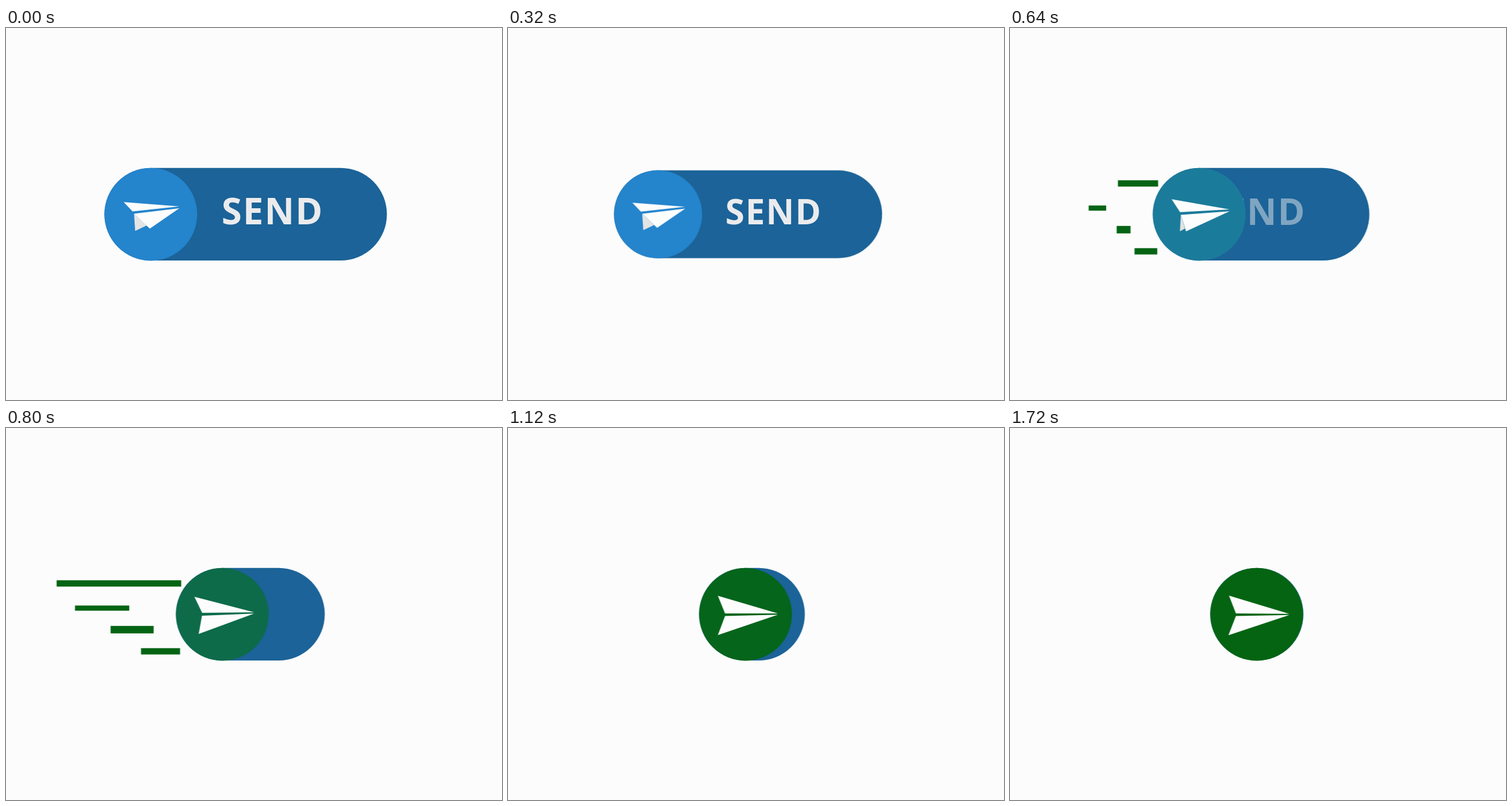
An HTML page without scripts for the animation above (1.76 s loop, 864x648 px).

```html
<!DOCTYPE html>
<html lang="en">
<head>
<meta charset="utf-8">
<title>Send button</title>
<style>
  html, body { margin: 0; width: 100%; height: 100%; overflow: hidden; background: #fcfcfc; }
  svg { display: block; width: 100%; height: 100%; }

  .button, .slide, .pill, .disc, .label, .wing, .keel, .fold, .streaks path {
    animation: 1760ms linear infinite both;
  }

  .button { transform-origin: 432px 324.5px; animation-name: press; animation-timing-function: ease-in-out; }
  .slide { animation-name: slide; }
  .pill { fill: #1b6398; animation-name: shrink; }
  .disc { fill: #2484cc; animation-name: tint; }
  .label {
    fill: #ebebed;
    font: 700 64px "Open Sans", "Noto Sans", sans-serif;
    letter-spacing: 1.8px;
    animation-name: leave;
  }
  .wing, .keel { fill: #fdfdfd; }
  .wing { animation-name: wing; }
  .keel { animation-name: keel; }
  .fold { fill: #e4e4e4; animation-name: fold; }
  .streaks path {
    fill: none;
    stroke: #046414;
    stroke-dasharray: 1 2;
    animation-name: streak;
    animation-delay: 60ms;
  }
  .streaks .first { animation-delay: 0ms; }

  @keyframes press {
    0%, 25%, 100% { transform: scale(1); }
    12.5% { transform: scale(.91); }
  }

  @keyframes slide {
    0%, 25% { transform: translateX(0); }
    27.27% { transform: translateX(4.4px); }
    29.55% { transform: translateX(15.5px); }
    31.82% { transform: translateX(32px); }
    34.09% { transform: translateX(54px); }
    36.36% { transform: translateX(77px); }
    38.64% { transform: translateX(94px); }
    40.91% { transform: translateX(106.5px); }
    45.45% { transform: translateX(124.5px); }
    50% { transform: translateX(136.7px); }
    54.55% { transform: translateX(147.3px); }
    63.64% { transform: translateX(161.5px); }
    72.73% { transform: translateX(171.3px); }
    81.82% { transform: translateX(176px); }
    97.73%, 100% { transform: translateX(177.5px); }
  }

  @keyframes shrink {
    0%, 25% { width: 492px; }
    27.27% { width: 487.6px; }
    29.55% { width: 475.5px; }
    31.82% { width: 456.2px; }
    34.09% { width: 425.7px; }
    36.36% { width: 378.2px; }
    38.64% { width: 333.9px; }
    40.91% { width: 300.1px; }
    45.45% { width: 259.5px; }
    50% { width: 231px; }
    54.55% { width: 210.5px; }
    63.64% { width: 184.1px; }
    72.73% { width: 169.7px; }
    81.82% { width: 163.5px; }
    97.73%, 100% { width: 162px; }
  }

  @keyframes tint {
    0%, 26% { fill: #2484cc; }
    29.55% { fill: #2382c6; }
    33% { fill: #2081ba; }
    45.45% { fill: #0d6b4a; }
    54.55% { fill: #08672c; }
    63.64% { fill: #04651b; }
    81.82%, 100% { fill: #046412; }
  }

  @keyframes leave {
    0%, 27.27% { transform: translateX(0); opacity: 1; }
    29.55% { transform: translateX(-1px); }
    31.82% { transform: translateX(-4px); opacity: 1; }
    34.09% { transform: translateX(-12px); }
    36.36% { transform: translateX(-37px); }
    38.64% { transform: translateX(-64px); }
    40.91%, 100% { transform: translateX(-85px); opacity: 0; }
  }

  @keyframes wing {
    0%, 26% { d: path("M205 303.3L302 310.7L220.5 319.5Z"); }
    29.55% { d: path("M204.5 301.5L303 312.3L220 319.7Z"); }
    45.45% { d: path("M203.5 294L307.5 321L217 322Z"); }
    63.64% { d: path("M204 292.3L308.5 323L216.5 323Z"); }
    81.82%, 100% { d: path("M204 292L309 323.7L216 323Z"); }
  }

  @keyframes keel {
    0%, 26% { d: path("M223 323.5L302 314L250.5 349.5Z"); }
    29.55% { d: path("M222.5 324.5L303 316L243 351Z"); }
    45.45% { d: path("M216.7 327L307.5 323.3L211 358.7Z"); }
    63.64% { d: path("M216.5 327.5L308.5 325.3L204 360.7Z"); }
    81.82%, 100% { d: path("M216 327.5L309 325.8L203 361Z"); }
  }

  @keyframes fold {
    0%, 26% { d: path("M223 323.5L225 353.5L245 344Z"); opacity: 1; }
    29.55% { d: path("M222.7 324.5L223.5 352.7L238 345Z"); opacity: 1; }
    43% { opacity: 1; }
    45.45%, 100% { d: path("M216.7 327L212 356L213 355Z"); opacity: 0; }
  }

  /* grows out to the left, then its near end catches up */
  @keyframes streak {
    0%, 28.7% { stroke-dashoffset: 1; visibility: hidden; }
    28.71% { stroke-dashoffset: 1; visibility: visible; }
    42.05%, 45.45% { stroke-dashoffset: 0; }
    54.55% { stroke-dashoffset: -1; visibility: visible; }
    54.56%, 100% { stroke-dashoffset: -1; visibility: hidden; }
  }
</style>
</head>
<body>
<svg viewBox="0 0 864 648">
  <g class="button">
    <g class="slide">
      <rect class="pill" x="171.5" y="243.7" width="492" height="161.4" rx="80.7"/>
    </g>
    <text class="label" x="375.5" y="342.5">SEND</text>
    <g class="slide">
      <g class="streaks">
        <path d="M180.5 270.8H-36.5" pathLength="1" stroke-width="11"/>
        <path d="M90 313.7H-4.5" pathLength="1" stroke-width="9"/>
        <path d="M132.5 351.3H57.5" pathLength="1" stroke-width="13"/>
        <path class="first" d="M179 389H110.5" pathLength="1" stroke-width="11"/>
      </g>
      <circle class="disc" cx="252.2" cy="324.6" r="80.8"/>
      <path class="fold" d="M223 323.5L225 353.5L245 344Z"/>
      <path class="wing" d="M205 303.3L302 310.7L220.5 319.5Z"/>
      <path class="keel" d="M223 323.5L302 314L250.5 349.5Z"/>
    </g>
  </g>
</svg>
</body>
</html>
```
